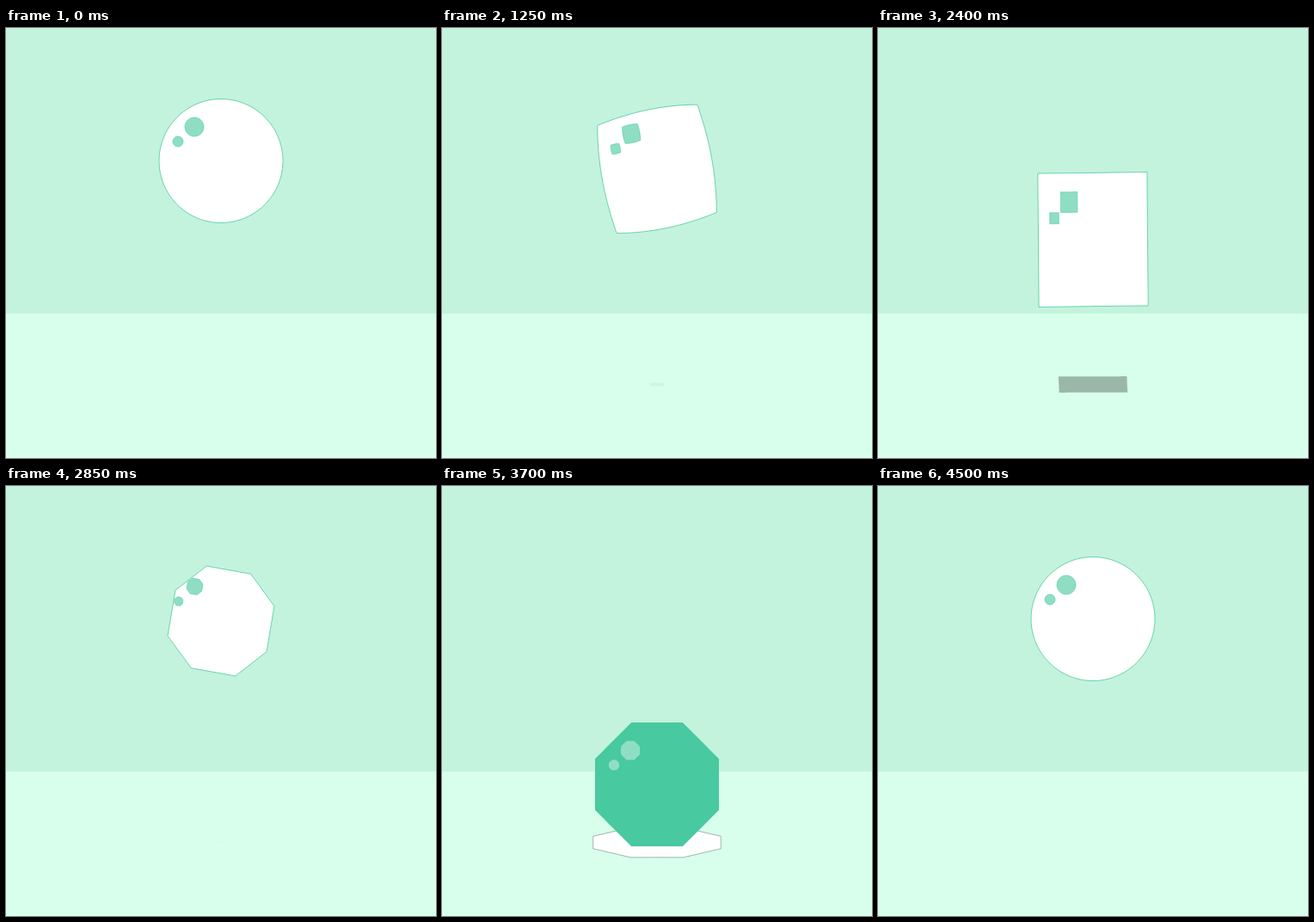
These frames come from a looping animation (500x500 px, 4550 ms). An HTML page with a canvas:

```html
<!DOCTYPE html>
<html lang="en">
<head>
<meta charset="utf-8">
<title>Bouncing shapes</title>
<style>
  html, body { margin: 0; overflow: hidden; }
  canvas { display: block; }
</style>
</head>
<body>
<canvas id="stage" width="500" height="500"></canvas>
<script>
const ctx = document.getElementById('stage').getContext('2d');
const LOOP = 4550, STEP = 50, BOUNCE = 1500, RADIUS = 72;
const TEAL = '#48c9a0', SHINE = '#8fdec3';
const mix = (a, b, f) => a + (b - a) * f;
const polar = (r, eighths) => [r * Math.cos(eighths * Math.PI / 4), r * Math.sin(eighths * Math.PI / 4)];

// Unit outlines, each walked in eight sections: section i, fraction f.
const straight = key => (i, f) => {
  const a = key(i), b = key(i + 1);
  return [mix(a[0], b[0], f), mix(a[1], b[1], f)];
};
const circle = (i, f) => polar(1, i + f);
const square = straight(i => polar(i % 2 ? Math.SQRT2 : 1, i));
const octagon = straight(i => polar(1 / Math.cos(Math.PI / 8), i + 0.5));

// The shift pairs up sections, which makes the outline turn while it morphs.
const morphs = [
  { from: circle, to: square, shift: -1 },
  { from: square, to: octagon, shift: 3 },
  { from: octagon, to: circle, shift: 1 },
];

function outline({ from, to, shift }, e) {
  const points = [], parts = 12;
  for (let k = 0; k < 8 * parts; k++) {
    const i = Math.floor(k / parts), f = k % parts / parts;
    const a = from(i + shift, f), b = to(i, f);
    points.push([mix(a[0], b[0], e), mix(a[1], b[1], e)]);
  }
  return points;
}

function draw(points, x, y, rx, ry, fill, stroke, width) {
  ctx.beginPath();
  for (const [px, py] of points) ctx.lineTo(x + px * rx, y + py * ry);
  ctx.closePath();
  ctx.fillStyle = fill;
  ctx.fill();
  if (!stroke) return;
  ctx.strokeStyle = stroke;
  ctx.lineWidth = width;
  ctx.stroke();
}

// Pose at a distance in ms from the top of the bounce.
function pose(t) {
  const u = Math.min(1, t / 600), v = Math.min(1, Math.max(0, (t - 600) / 100));
  let stretch = 0.1 * u * u * (3 - 2 * u) * (1 - v) ** 1.5;
  if (t > 700) stretch = -0.1 * (t - 700) / 50;
  const drop = 91.5 * u ** 2.6 + 101 * v ** 1.5 - RADIUS * Math.min(0, stretch);
  const near = 1 - Math.sqrt(1 - Math.min(1, t / 702) ** 2);
  return { stretch, y: 154.5 + drop, near };
}

function render(time) {
  const phase = time % BOUNCE;
  const { stretch, y, near } = pose(Math.min(phase, BOUNCE - phase));
  const progress = Math.max(0, (phase - 850) / 650);
  const e = (1 - Math.cos(Math.PI * progress)) / 2;
  const points = outline(morphs[Math.floor(time / BOUNCE) % 3], e);
  const sx = 1 - stretch, sy = 1 + stretch;

  ctx.fillStyle = '#c3f3dc';
  ctx.fillRect(0, 0, 500, 332);
  ctx.fillStyle = '#d8ffeb';
  ctx.fillRect(0, 332, 500, 168);

  // The darker of ball and shadow is blank, with a fine rim.
  const alpha = 0.59 * near, blankShadow = alpha > 0.347;
  const size = 0.05 + 0.95 * near;
  if (alpha > 0) {
    draw(points, 250, 414.5, 80 * size, 18.7 * size,
      blankShadow ? '#fff' : `rgba(0,0,0,${alpha})`, blankShadow && '#6f8279', 0.6);
  }
  const rim = blankShadow ? null : TEAL;
  const part = (dx, dy, r, fill, width) =>
    draw(points, 250 + dx * sx, y + dy * sy, r * sx, r * sy, fill, rim, width);
  part(0, 0, RADIUS, blankShadow ? TEAL : '#fff', 0.8);
  part(-31, -39.5, 11, SHINE, 0.6);
  part(-50, -22.5, 6, SHINE, 0.6);
}

const start = performance.now();
function tick() {
  const time = (performance.now() - start) % LOOP;
  render(Math.floor(time / STEP) * STEP);
  requestAnimationFrame(tick);
}
tick();
</script>
</body>
</html>
```
